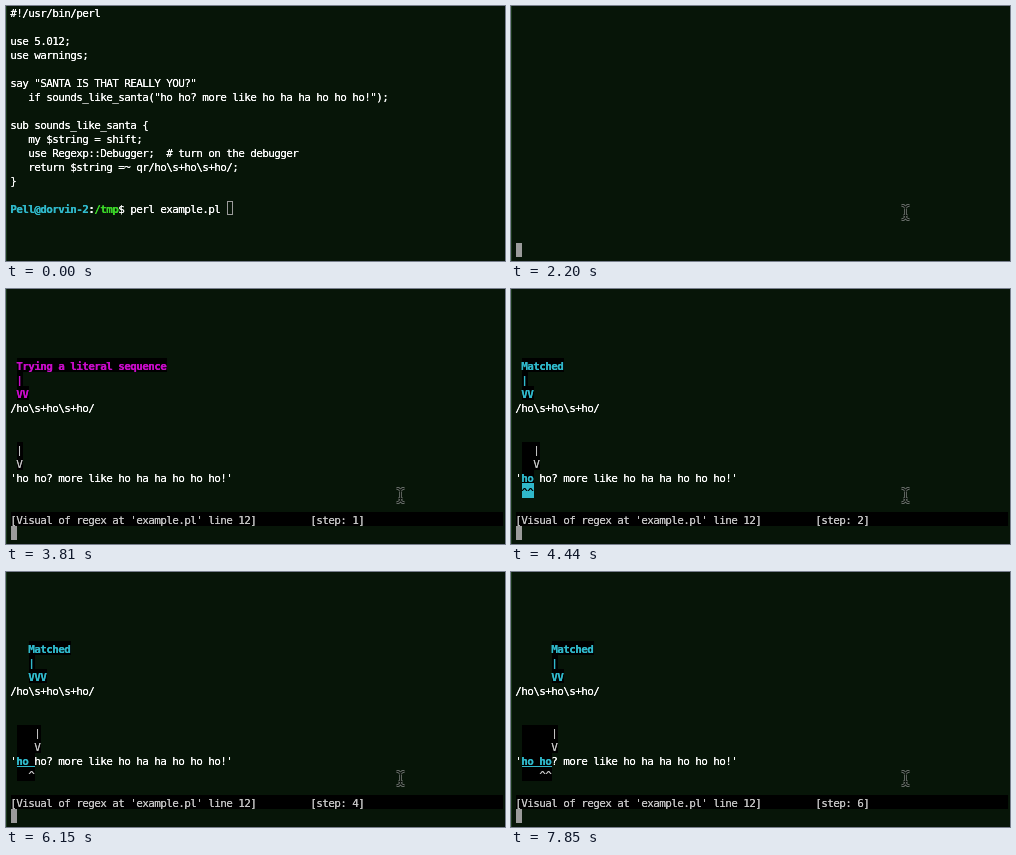
An HTML page with a canvas that plays this animation: 499x255 px, repeating every 8 s.

```html
<!DOCTYPE html>
<html lang="en">
<head>
<meta charset="utf-8">
<title>Regex debugger session</title>
<style>
html, body { margin: 0; width: 100%; height: 100%; overflow: hidden; background: #071508; }
canvas { display: block; }
</style>
</head>
<body>
<canvas id="stage" width="499" height="255"></canvas>
<script>
const ctx = document.getElementById('stage').getContext('2d');
const LOOP = 8000, CW = 6, CH = 14, LEFT = 5;
const BG = '#071508', BLACK = '#000', WHITE = '#fff', GREY = '#c4c4c4';
const CYAN = '#30b8ca', GREEN = '#3bd528', MAGENTA = '#c80cc8', BLOCK = '#9b9b9b';
const FONT = '11px "DejaVu Sans Mono", "Liberation Mono", monospace';

const script = [
  '#!/usr/bin/perl',
  '',
  'use 5.012;',
  'use warnings;',
  '',
  'say "SANTA IS THAT REALLY YOU?"',
  '   if sounds_like_santa("ho ho? more like ho ha ha ho ho ho!");',
  '',
  'sub sounds_like_santa {',
  '   my $string = shift;',
  '   use Regexp::Debugger;  # turn on the debugger',
  '   return $string =~ qr/ho\\s+ho\\s+ho/;',
  '}'
];
const pattern = '/ho\\s+ho\\s+ho/';
const subject = "'ho ho? more like ho ha ha ho ho ho!'";
const literal = 'Trying a literal sequence';
const space = 'Trying a whitespace character, one-or-more times (as many as possible)';

// col/span: place in the pattern; pos: place in the subject; caret: just matched
const steps = [
  { at: 2290, msg: 'Restarting regex match', color: GREY, col: 1, span: 1, pos: 1 },
  { at: 3810, msg: literal, color: MAGENTA, col: 1, span: 2, pos: 1 },
  { at: 4440, msg: 'Matched', color: CYAN, col: 1, span: 2, pos: 3, caret: 2, inverse: true },
  { at: 5430, msg: space, color: MAGENTA, col: 3, span: 3, pos: 3 },
  { at: 6150, msg: 'Matched', color: CYAN, col: 3, span: 3, pos: 4, caret: 1 },
  { at: 7320, msg: literal, color: MAGENTA, col: 6, span: 2, pos: 4 },
  { at: 7850, msg: 'Matched', color: CYAN, col: 6, span: 2, pos: 6, caret: 2 }
];

const cellX = col => LEFT + col * CW;
const cellY = row => row * CH - 1;

function fill(col, row, count, color) {
  ctx.fillStyle = color;
  ctx.fillRect(cellX(col), cellY(row), count * CW, CH);
}

function put(text, col, row, color = WHITE, bold = false, back = null) {
  if (back) fill(col, row, text.length, back);
  ctx.font = (bold ? 'bold ' : '') + FONT;
  ctx.fillStyle = color;
  // glyphs are five pixels wide; a second pass hardens their edges
  for (let pass = 0; pass < 2; pass++) {
    [...text].forEach((ch, i) => {
      if (ch !== ' ') ctx.fillText(ch, cellX(col + i) + 2.5, row * CH + 11);
    });
  }
}

function drawShell(focused) {
  script.forEach((line, row) => put(line, 0, row));
  put('Pell@dorvin-2', 0, 14, CYAN, true);
  put(':', 13, 14, WHITE, true);
  put('/tmp', 14, 14, GREEN, true);
  put('$ perl example.pl', 18, 14);
  if (focused) {
    fill(36, 14, 1, BLOCK);
  } else {
    ctx.strokeStyle = BLOCK;
    ctx.lineWidth = 1;
    ctx.strokeRect(cellX(36) + 0.5, cellY(14) + 0.5, CW - 1, CH - 1);
  }
}

function drawStep(s, n) {
  const bold = s.color !== GREY;
  put(s.msg, s.col, 5, s.color, bold, BLACK);
  put('|', s.col, 6, s.color, bold, BLACK);
  put('V'.repeat(s.span), s.col, 7, s.color, bold, BLACK);
  put(pattern, 0, 8);

  const pad = ' '.repeat(s.pos - 1);
  put(pad + '|', 1, 11, GREY, false, BLACK);
  put(pad + 'V', 1, 12, GREY, false, BLACK);
  put(subject[0], 0, 13);
  put(subject.slice(s.pos), s.pos, 13);
  if (s.pos > 1) {
    put(subject.slice(1, s.pos), 1, 13, CYAN, true, BLACK);
    ctx.fillRect(cellX(1), 194, pad.length * CW, 1);
  }
  if (s.caret) {
    const marks = '^'.repeat(s.caret).padStart(pad.length);
    put(marks, 1, 14, s.inverse ? BLACK : GREY, false, s.inverse ? CYAN : BLACK);
  }

  fill(0, 16, 82, BLACK);
  put("[Visual of regex at 'example.pl' line 12]", 0, 16, GREY);
  put('[step: ' + n + ']', 50, 16, GREY);
  fill(0, 17, 1, BLOCK);
}

function drawPointer(x, y) {
  ctx.beginPath();
  for (const end of [-1, 1]) {
    ctx.moveTo(x - 4, y + 7 * end);
    ctx.lineTo(x - 2, y + 7 * end);
    ctx.lineTo(x, y + 5 * end);
    ctx.lineTo(x + 2, y + 7 * end);
    ctx.lineTo(x + 4, y + 7 * end);
  }
  ctx.moveTo(x, y - 5);
  ctx.lineTo(x, y + 5);
  ctx.moveTo(x - 2, y + 3);
  ctx.lineTo(x + 2, y + 3);
  for (const [width, color] of [[3, '#666c67'], [1.2, '#0c140d']]) {
    ctx.lineWidth = width;
    ctx.strokeStyle = color;
    ctx.stroke();
  }
}

function draw(t) {
  ctx.fillStyle = BG;
  ctx.fillRect(0, 0, 499, 255);
  ctx.fillStyle = '#1a3a1c';
  ctx.fillRect(0, 0, 1, 255);
  ctx.textAlign = 'center';

  const n = steps.findLastIndex(s => t >= s.at);
  if (n >= 0) drawStep(steps[n], n);
  else if (t < 2200) drawShell(t >= 850);
  else fill(0, 17, 1, BLOCK);

  if (t >= 500) {
    // the pointer slides in over four ticks and slows down
    const k = Math.min(3, Math.floor((t - 500) / 87));
    const rest = (1 - k / 3) ** 2;
    drawPointer(394.5 + 35 * rest, 206.5 + 23 * rest);
  }
}

const start = performance.now();
function tick() {
  draw((performance.now() - start) % LOOP);
  requestAnimationFrame(tick);
}
tick();
</script>
</body>
</html>
```
